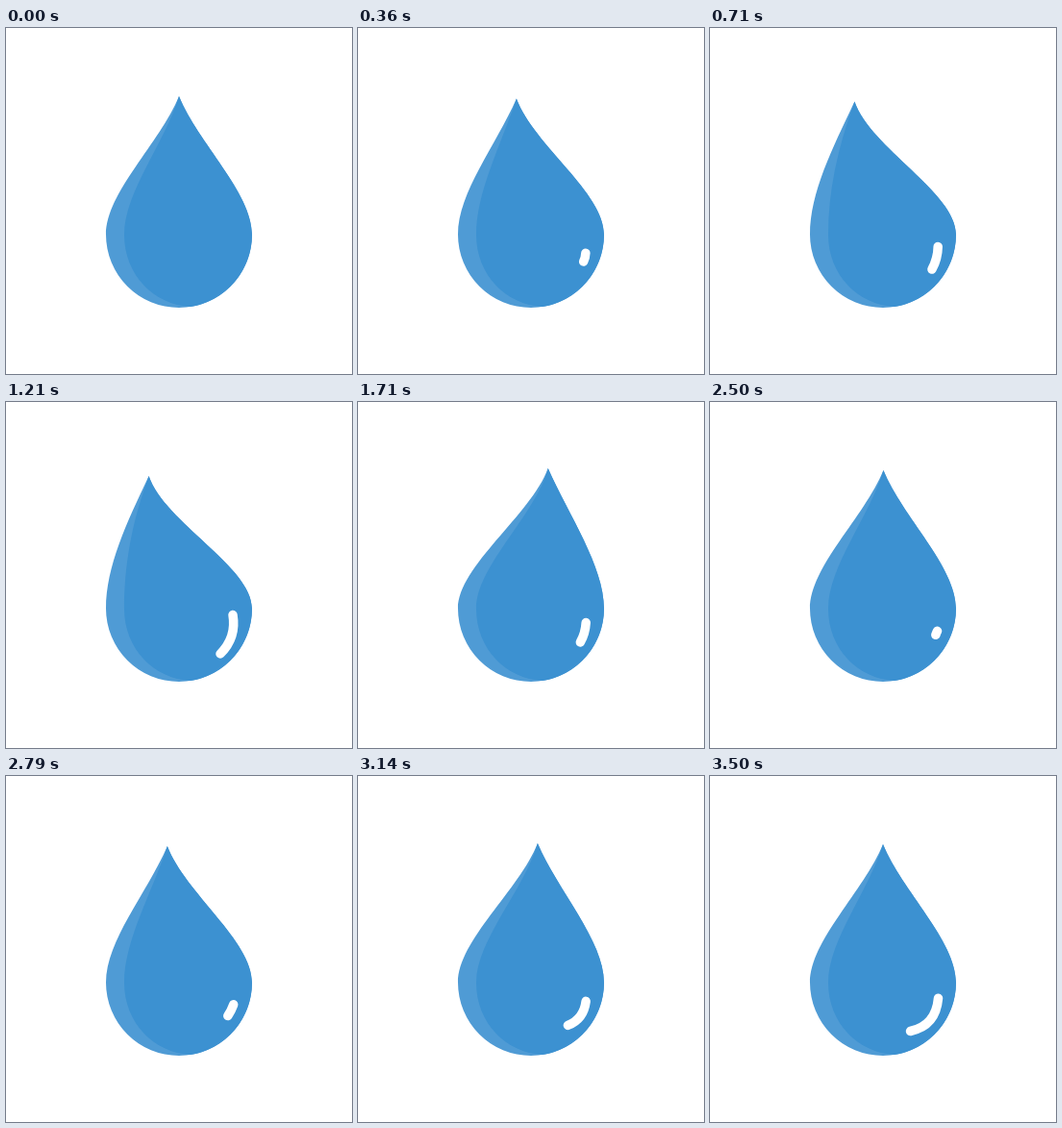
An HTML page for the animation above (3570 ms loop, 360 by 360 pixels).

```html
<!DOCTYPE html>
<html lang="en">
<head>
<meta charset="utf-8">
<title>Water drop</title>
<style>
  html, body { margin: 0; width: 100%; height: 100%; overflow: hidden; background: #fff; }
  svg { display: block; width: 100%; height: 100%; }
</style>
</head>
<body>
<svg viewBox="0 0 360 360">
  <path id="rim" fill="#4f9bd5"/>
  <path id="body" fill="#3c91d1"/>
  <path id="shine" fill="none" stroke="#fff" stroke-width="9.5" stroke-linecap="round"/>
</svg>
<script>
const LOOP = 3570, STEP = LOOP / 50;

// Horizontal swing of the tip: [ms, x]
const swing = [
  [0, 180], [570, 154], [710, 150.5], [960, 145], [1210, 148.5], [1710, 197.5],
  [2030, 212], [2210, 206.5], [2720, 167], [2790, 168], [3120, 187], [3430, 180], [3570, 180]
];

// Highlight curve: [ms, start, control, end]
const glint = [
  [0, 236.5, 238.5, 236.5, 238.5, 236.5, 238.5],
  [710, 237.2, 227.5, 237, 240, 231, 251],
  [1210, 236, 221.5, 240, 245, 223, 262],
  [1710, 237.2, 229.5, 236.5, 241, 231.3, 250],
  [2230, 236.5, 238.5, 236.5, 238.5, 236.5, 238.5],
  [2790, 236.7, 237.8, 234.5, 244, 230.7, 249.7],
  [3500, 237.5, 231.2, 235, 260, 208.5, 265.5]
];

const slope = (a, b, j) => (b[j] - a[j]) / (b[0] - a[0]);

// Tangent at key i, flat at the ends and at turning points
function tangent(keys, i, j) {
  if (!i || i === keys.length - 1) return 0;
  const a = slope(keys[i - 1], keys[i], j), b = slope(keys[i], keys[i + 1], j);
  return a * b > 0 ? 2 * a * b / (a + b) : 0;
}

// Smooth curve through the keys, one value per column
function sample(keys, t) {
  let i = 0;
  while (i < keys.length - 2 && t >= keys[i + 1][0]) i++;
  const a = keys[i], b = keys[i + 1], span = b[0] - a[0];
  const u = Math.min(1, (t - a[0]) / span), s = u * u * (3 - 2 * u);
  return a.slice(1).map((v, k) => {
    const j = k + 1;
    return v + (b[j] - v) * s + span * u * (1 - u) *
      ((1 - u) * tangent(keys, i, j) - u * tangent(keys, i + 1, j));
  });
}

const set = (id, d) => document.getElementById(id).setAttribute("d", d);

function draw(t) {
  const [x] = sample(swing, t);
  const d = x - 180, y = 71 - 0.14 * d + 0.0016 * d * d;
  const bend = base => `${base + 1.1 * d} ${y + 49}`;
  const tip = `M${x} ${y}C`;
  const right = `A76 76 0 0 0 256 215C256 171 ${bend(200)} ${x} ${y}Z`;

  set("rim", `${tip}${bend(160)} 104 171 104 215${right}`);
  set("body", `${tip}${bend(165)} 123 171 123 215C123 257 154 288 192 290${right}`);

  const [x0, y0, cx, cy, x1, y1] = sample(glint, t);
  set("shine", t ? `M${x0} ${y0}Q${cx} ${cy} ${x1} ${y1}` : "");
}

function tick() {
  const t = performance.now() % LOOP;
  draw(Math.floor((t + 6) / STEP) % 50 * STEP);
  requestAnimationFrame(tick);
}
tick();
</script>
</body>
</html>
```
